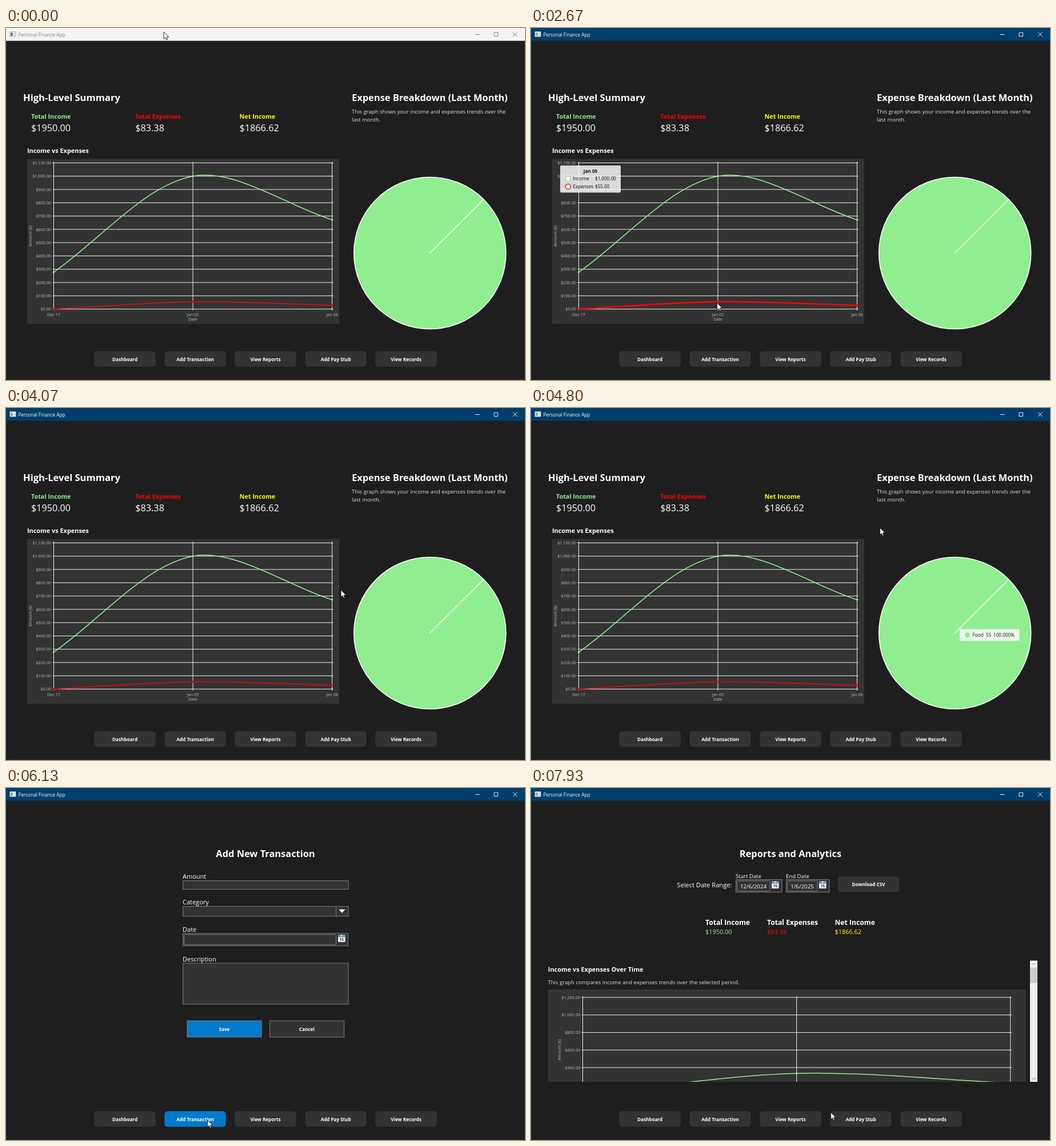
Write an HTML page that moves like this. It is 908 px wide and 617 px high and loops after 8000 ms.

```html
<!DOCTYPE html>
<html lang="en">
<head>
<meta charset="utf-8">
<title>Personal Finance App</title>
<style>
html, body { margin: 0; width: 100%; height: 100%; overflow: hidden; background: #1e1e1e; }
svg { display: block; width: 908px; height: 617px; font-family: "Open Sans", "Noto Sans", sans-serif; }
.b { font-weight: 700; }
</style>
</head>
<body>
<svg id="stage" viewBox="0 0 908 617" xmlns="http://www.w3.org/2000/svg"></svg>
<script>
const LOOP = 8000;
const GREEN = '#90ee90', RED = '#ff0000', YELLOW = '#ffff00', BLUE = '#007acc';
const PANEL = '#333333', EDGE = '#7c7c7c', AXIS = '#b8b8b8';

const ACTIVATE = 2070, TO_FORM = 6070, TO_REPORT = 7730, GROW = 600;
const TIP_LINE = [2400, 3400], THICK = [2400, 3340], TIP_PIE = [4200, 5350];

// Pointer keys: time, x, y
const path = [
  [0, 276, 7], [70, 276, 7], [870, 306, 150], [1730, 346.5, 257],
  [1900, 346, 262], [2350, 327, 470], [2670, 325.5, 482], [3250, 331, 478],
  [3530, 372, 440], [4070, 586, 319], [4330, 690, 340], [4600, 690, 340],
  [4800, 610.5, 210], [5120, 222, 430], [5400, 300, 562], [5640, 352.5, 582],
  [6530, 352.5, 582], [7200, 440, 581], [7400, 444, 581], [7600, 448, 586],
  [7790, 448, 586], [7930, 524.5, 568.5], [8000, 560, 555]
];

const text = (x, y, size, str, o = {}) =>
  `<text x="${x}" y="${y}" font-size="${size}" fill="${o.fill || '#fff'}"` +
  ` text-anchor="${o.at || 'start'}"${o.bold ? ' class="b"' : ''}${o.more || ''}>${str}</text>`;
const bold = (x, y, size, str, fill, at) => text(x, y, size, str, { fill, at, bold: true });
const rect = (x, y, w, h, fill, more = '') =>
  `<rect x="${x}" y="${y}" width="${w}" height="${h}" fill="${fill}" ${more}/>`;
const line = (d, stroke, w = 1, more = '') =>
  `<path d="${d}" fill="none" stroke="${stroke}" stroke-width="${w}" ${more}/>`;
const dot = (x, y, r, fill, more = '') => `<circle cx="${x}" cy="${y}" r="${r}" fill="${fill}" ${more}/>`;
const field = (x, y, w, h, more = '') => rect(x, y, w, h, PANEL, `stroke="${EDGE}" ${more}`);
const group = (id, body, more = '') => `<g id="${id}" ${more}>${body}</g>`;
const money = v => '$' + v.toLocaleString('en-US', { minimumFractionDigits: 2 });

// Cubic spline through the points, with tangents weighted by segment length
function spline(pts) {
  const s = 0.65, at = i => pts[Math.max(0, Math.min(pts.length - 1, i))];
  const mid = (a, b) => [(a[0] + b[0]) / 2, (a[1] + b[1]) / 2];
  const len = (a, b) => Math.hypot(a[0] - b[0], a[1] - b[1]);
  let d = 'M' + pts[0];
  for (let i = 0; i < pts.length - 1; i++) {
    const [p0, p1, p2, p3] = [at(i - 1), at(i), at(i + 1), at(i + 2)];
    const c1 = mid(p0, p1), c2 = mid(p1, p2), c3 = mid(p2, p3);
    const l1 = len(p0, p1), l2 = len(p1, p2), l3 = len(p2, p3);
    const k1 = l1 / (l1 + l2), k2 = l2 / (l2 + l3);
    const ctrl = (p, a, b, k) => [0, 1].map(j => p[j] + (c2[j] - a[j] - (b[j] - a[j]) * k) * s);
    d += `C${ctrl(p1, c1, c2, k1)} ${ctrl(p2, c2, c3, k2)} ${p2}`;
  }
  return d;
}

const income = [278, 1000, 672], expenses = [0, 55, 28.38];
const dates = ['Dec 17', 'Jan 05', 'Jan 06'];

function plot(c) {
  const y = v => c.base - v * c.unit;
  const points = (vals, k) => vals.map((v, i) => [c.xs[i], y(v * k)]);
  const series = (vals, color, k = 1, w = 1.5) => {
    const pts = points(vals, k);
    return line(spline(pts), color, w) + pts.map(p => dot(p[0], p[1], 1.8, color)).join('');
  };
  let grid = '';
  for (let v = 0; v <= c.max; v += c.step) {
    grid += line(`M${c.xs[0] - 2} ${y(v)}H${c.xs[2] + 2}`, '#f0f0f0', 1) +
      text(c.xs[0] - 4.5, y(v) + 2.6, 7.25, money(v), { fill: AXIS, at: 'end' });
  }
  c.xs.forEach((x, i) => {
    grid += line(`M${x} ${y(c.max) - 2}V${c.base + 2.5}`, '#f0f0f0', 1) +
      text(x, c.base + 12.5, 7.2, dates[i], { fill: AXIS, at: 'middle' });
  });
  grid += text(c.xs[1], c.base + 20, 7.2, 'Date', { fill: AXIS, at: 'middle' });
  grid += text(0, 0, 7.2, 'Amount ($)', {
    fill: AXIS, at: 'middle', more: ` transform="translate(${c.nameX} ${c.nameY}) rotate(-90)"`
  });
  return { grid, series };
}

const small = plot({ xs: [83.5, 327, 570.5], base: 492.7, unit: 0.233, max: 1100, step: 100, nameX: 45, nameY: 364.5 });
const large = plot({ xs: [90.5, 464.7, 838.8], base: 551.6, unit: 0.1538, max: 1200, step: 200, nameX: 52, nameY: 459 });

const calendar = (x, y) =>
  rect(x, y, 12.5, 12.5, '#f4f4f4') + rect(x, y, 12.5, 4, '#6d93a8') +
  rect(x + 5, y, 2.5, 2, '#fff') + bold(x + 6.3, y + 10.8, 6.6, '15', '#333', 'middle');

function titleBar(active) {
  const bg = active ? '#003e6b' : '#f3f3f3', fg = active ? '#fff' : '#777';
  return rect(0, 0, 908, 22.5, bg) +
    line('M.5 22V610Q.5 616.5 7 616.5H901Q907.5 616.5 907.5 610V22', active ? '#0b3553' : '#3a3a3a') +
    rect(7, 6.5, 10, 8.5, '#fff', `stroke="${active ? '#c5d0d8' : '#999'}" stroke-width=".8"`) +
    rect(8, 8, 4, 6, active ? '#8aa9a4' : '#5d8680') + rect(13, 8, 3, 6, '#d5dadd') +
    text(21.5, 14.7, 8.17, 'Personal Finance App', { fill: active ? '#fff' : '#858585' }) +
    line('M821 11.5H828.5M854 8H860.5V14.5H854ZM887 7.5L894.5 15M894.5 7.5L887 15', fg, 0.9);
}

const tipBox = (x, y, w, h) => rect(x, y, w, h, '#fff', 'fill-opacity=".82" rx="2"');
const dark = { fill: '#111' };

const lineTip = tipBox(51, 241, 106, 47.5) +
  bold(104, 254, 8.2, 'Jan 05', '#111', 'middle') +
  [['Income', '$1,000.00', GREEN], ['Expenses', '$55.00', '#d81818']].map(([name, val, color], i) =>
    dot(64.8, 264 + i * 14, 4.6, '#fff', `stroke="${color}" stroke-width="1.5"`) +
    text(73.5, 267 + i * 14.2, 8.15, name, dark) + text(112, 267 + i * 14.2, 8.15, val, dark)).join('');

const pieTip = tipBox(750, 387.5, 104.5, 20.5) + dot(763.5, 398, 4.5, GREEN) +
  text(772.5, 401.2, 8.2, 'Food', dark) + text(796, 401.2, 8.2, '55', dark) + text(809, 401.2, 8.2, '100.000%', dark);

const totals = [['Total Income', '$1950.00', GREEN], ['Total Expenses', '$83.38', RED], ['Net Income', '$1866.62', YELLOW]];

const dashboard =
  bold(30, 128, 16.55, 'High-Level Summary') +
  totals.map(([name, val, color], i) =>
    bold(44 + i * 182.3, 159, 10.8, name, color) + text(44 + i * 182.3, 180.5, 16.2, val)).join('') +
  bold(37, 219, 10.9, 'Income vs Expenses') +
  rect(37, 229.5, 546, 289, PANEL) + small.grid + small.series(income, GREEN) +
  group('thin', small.series(expenses, RED)) + group('thick', small.series(expenses, RED, 1, 2.6)) +
  bold(605, 128, 16.42, 'Expense Breakdown (Last Month)') +
  text(605, 150.2, 9.55, 'This graph shows your income and expenses trends over the', { fill: '#dcdcdc' }) +
  text(605, 163.7, 9.55, 'last month.', { fill: '#dcdcdc' }) +
  dot(741.7, 394.5, 133, GREEN, 'stroke="#fff" stroke-width="1.6"') +
  line('M741 395L836 300', '#fff', 1.5) +
  group('lineTip', lineTip) + group('pieTip', pieTip);

const form =
  bold(454, 121, 16.4, 'Add New Transaction', '#fff', 'middle') +
  [['Amount', 159], ['Category', 204.3], ['Date', 251.5], ['Description', 303.8]].map(([s, y]) => text(309, y, 11, s)).join('') +
  field(309.5, 162.5, 289.5, 15) +
  field(309.5, 207.5, 289.5, 17.3) + line('M577.5 207.5V225', EDGE) + '<path d="M582 212.8H593.5L587.8 219Z" fill="#fff"/>' +
  field(309.5, 254.8, 289, 21.8) + field(311.5, 256.8, 266, 18, 'rx="1.5"') + calendar(581, 257.5) +
  field(309.5, 307, 289.5, 72) +
  rect(317, 408, 130, 28.7, BLUE, `stroke="${EDGE}"`) + field(461.5, 408, 130, 28.7) +
  bold(382, 425.7, 8.15, 'Save', '#fff', 'middle') + bold(526.3, 425.7, 8.15, 'Cancel', '#fff', 'middle');

const picker = (x, w, label, date) =>
  text(x, 157.6, 9.6, label) + field(x + 0.5, 160.5, w, 22.2) + field(x + 2.5, 162.7, w - 23, 18, 'rx="1.5"') +
  text(x + (w - 18.5) / 2, 175.6, 9.75, date, { at: 'middle' }) + calendar(x + w - 17.5, 163.5);

const report =
  bold(454, 121, 16.4, 'Reports and Analytics', '#fff', 'middle') +
  text(255.3, 173.6, 11.15, 'Select Date Range:') +
  picker(358, 80.5, 'Start Date', '12/6/2024') + picker(446, 75.5, 'End Date', '1/6/2025') +
  rect(537, 155, 107, 27.3, PANEL, 'rx="5"') + bold(590.5, 171.6, 8.15, 'Download CSV', '#fff', 'middle') +
  totals.map(([name, val, color], i) => {
    const x = [305, 413, 531.5][i];
    return bold(x, 240, 12.15, name) + text(x, 256, 10.9, val, { fill: color });
  }).join('') +
  bold(29.8, 321.6, 10.93, 'Income vs Expenses Over Time') +
  text(29.5, 343.5, 9.54, 'This graph compares income and expenses trends over the selected period.', { fill: '#dcdcdc' }) +
  group('view', rect(29.5, 353, 836.5, 240, PANEL, 'rx="3"') + large.grid + group('curves', ''), 'clip-path="url(#port)"') +
  rect(873, 302.5, 13, 212.5, '#f0f0f0') + rect(873, 315, 13, 27, '#cdcdcd') +
  line('M876.5 310L879.5 307L882.5 310M876.5 508L879.5 511L882.5 508', '#8a8a8a', 1);

const tabs = ['Dashboard', 'Add Transaction', 'View Reports', 'Add Pay Stub', 'View Records'];
const tabX = i => 154.3 + i * 123;

const stage = document.getElementById('stage');
stage.innerHTML =
  '<defs><clipPath id="port"><rect x="0" y="300" width="908" height="215"/></clipPath></defs>' +
  rect(0, 0, 908, 617, '#1e1e1e') +
  group('idle', titleBar(false)) + group('active', titleBar(true)) +
  group('dash', dashboard) + group('form', form) + group('report', report) +
  tabs.map((s, i) => rect(tabX(i), 566.5, 107.4, 27.3, PANEL, `rx="5.5" id="tab${i}"`) +
    bold(tabX(i) + 53.7, 583.5, 8.15, s, '#fff', 'middle')).join('') +
  group('pointer', '<path d="M0 0V12.4L2.8 9.7L4.6 13.9L6.6 13L4.9 8.9H8.8Z" fill="#fff" stroke="#000" stroke-width=".8"/>');

const el = id => document.getElementById(id);
const show = (id, on) => { el(id).style.display = on ? '' : 'none'; };
const within = (t, [a, b]) => t >= a && t < b;

function pointerAt(t) {
  const i = path.findIndex((p, n) => n && t <= p[0]);
  const [t0, x0, y0] = path[i - 1], [t1, x1, y1] = path[i];
  const u = (t - t0) / (t1 - t0), k = u * u * (3 - 2 * u);
  return [x0 + (x1 - x0) * k, y0 + (y1 - y0) * k];
}

function draw(now) {
  const t = now % LOOP;
  show('idle', t < ACTIVATE);
  show('active', t >= ACTIVATE);
  show('dash', t < TO_FORM);
  show('form', within(t, [TO_FORM, TO_REPORT]));
  show('report', t >= TO_REPORT);
  show('lineTip', within(t, TIP_LINE));
  show('pieTip', within(t, TIP_PIE));
  show('thick', within(t, THICK));
  show('thin', !within(t, THICK));
  if (t >= TO_REPORT) {
    const k = Math.min(1, (t - TO_REPORT) / GROW);
    el('curves').innerHTML = large.series(income, GREEN, k) + large.series(expenses, RED, k);
  }
  const [x, y] = pointerAt(t);
  el('pointer').setAttribute('transform', `translate(${x} ${y})`);
  tabs.forEach((_, i) => {
    const over = x > tabX(i) + 3 && x < tabX(i) + 104 && y > 569 && y < 591;
    el('tab' + i).setAttribute('fill', over ? BLUE : PANEL);
  });
  requestAnimationFrame(frame);
}

let start;
function frame(now) {
  if (start === undefined) start = now;
  draw(Math.max(0, now - start));
}
draw(0);
</script>
</body>
</html>
```
